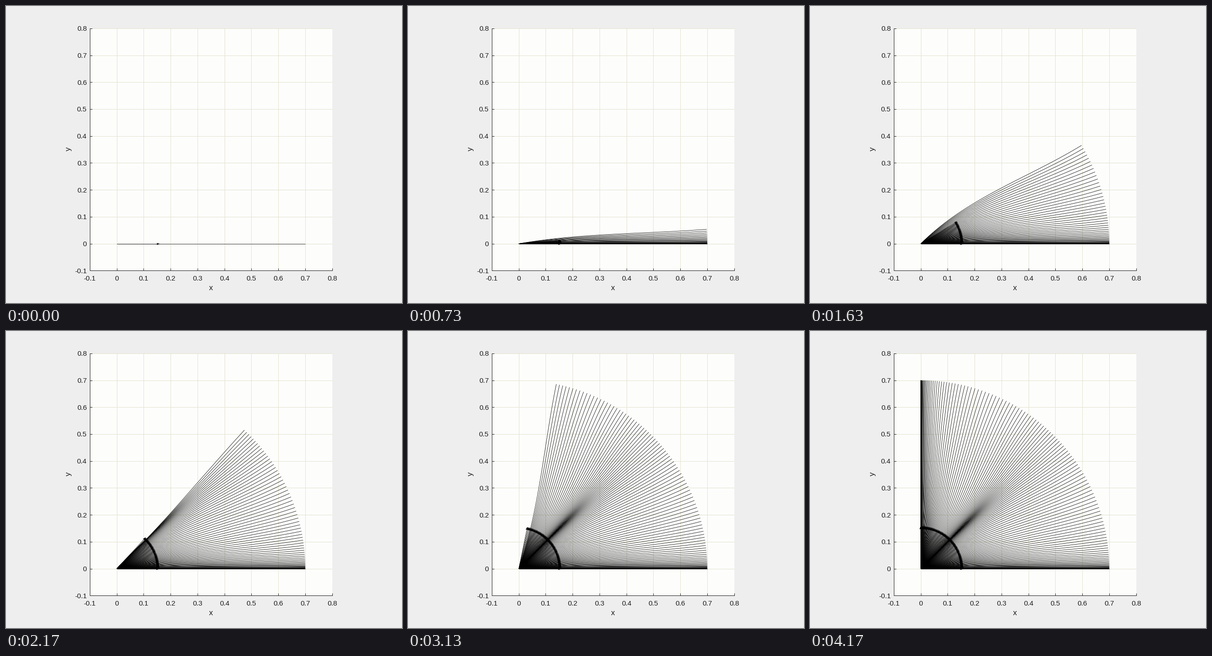
A matplotlib script that plays this animation: 864x648 px, repeating every 4210 ms.

```python
import numpy as np
import matplotlib.pyplot as plt
from matplotlib.animation import FuncAnimation
from matplotlib.collections import LineCollection, PolyCollection

W, H = 864, 648
LOOP_MS, POSES = 4210, 126
LENGTH = 0.7
LINE_W = 0.78
INK = "#1c1c1c"

plt.rcParams["font.family"] = "Liberation Sans"


def harmonics(coefs, phase):
    return sum(c * np.sin(k * phase) for k, c in enumerate(coefs, 1))


def rotate(points, angle):
    c, s = np.cos(angle), np.sin(angle)
    return np.asarray(points) @ np.array([[c, s], [-s, c]])


# Rest-to-rest quarter turn; the beam bends ahead of its chord, then behind.
phase = np.linspace(0, 2 * np.pi, POSES)
angles = (phase + harmonics([-0.729, -0.176, 0.0233, 0.0029], phase)) / 4
bends = harmonics([0.01794, -0.00976, 0.00362, -0.00232], phase)

U = np.linspace(0, 1, 31)
SHAPE = 6.75 * U * (1 - U) ** 2
SHAFT = [(0, 0), (0.15, 0)]
HEAD = [(0.158, 0), (0.1475, 0.0036), (0.15, 0), (0.1475, -0.0036)]

beams = [rotate(np.column_stack([LENGTH * U, b * SHAPE]), a)
         for a, b in zip(angles, bends)]
shafts = [rotate(SHAFT, a) for a in angles]
heads = [rotate(HEAD, a) for a in angles]

fig = plt.figure(figsize=(W / 72, H / 72), dpi=72, facecolor="#eeeeee")
LEFT, RIGHT, TOP, BOTTOM = 183, 711.7, 49, 577.3
ax = fig.add_axes([LEFT / W, 1 - BOTTOM / H,
                   (RIGHT - LEFT) / W, (BOTTOM - TOP) / H],
                  facecolor="#fdfdfc")
ax.set(xlim=(-0.1, 0.8), ylim=(-0.1, 0.8))
ticks = np.arange(-1, 9) / 10
ax.set_xticks(ticks, [])
ax.set_yticks(ticks, [])
ax.set_axisbelow(True)
ax.grid(color="#e2e2ce", linewidth=1)
ax.tick_params(direction="in", length=5.3, width=1, color=INK)
for side, spine in ax.spines.items():
    spine.set(visible=side in ("left", "bottom"), color=INK, linewidth=1)


def label(x, y, text, size=15.43, **kw):
    fig.text(x / W, 1 - y / H, text, fontsize=size, color=INK, **kw)


step = (RIGHT - LEFT) / 9
for k, v in enumerate(ticks):
    text = f"{v:g}"
    label(LEFT + k * step, 598.7, text, ha="center", va="baseline")
    label(176.3, BOTTOM - k * step + 5.6, text, ha="right", va="baseline")
label(447, 620, "x", 17, ha="center", va="baseline")
label(136.5, 313, "y", 17, ha="center", va="center", rotation=90)

beam_art = LineCollection([], colors="black", linewidths=LINE_W, zorder=3)
shaft_art = LineCollection([], colors="black", linewidths=0.6, zorder=3)
head_art = PolyCollection([], facecolors="black", edgecolors="black",
                          linewidths=0.3, zorder=3)
for art in (beam_art, shaft_art, head_art):
    ax.add_collection(art, autolim=False)


def draw(tick):
    # Two ticks per pose, so a new pose can start on a half step.
    shown = min((tick + 1) // 2, POSES - 1) + 1
    beam_art.set_segments(beams[:shown])
    shaft_art.set_segments(shafts[:shown])
    head_art.set_verts(heads[:shown])
    return beam_art, shaft_art, head_art


TICKS = 2 * POSES
anim = FuncAnimation(fig, draw, frames=TICKS, init_func=lambda: draw(0),
                     interval=LOOP_MS / TICKS, repeat=True, repeat_delay=0)
plt.show()
```
